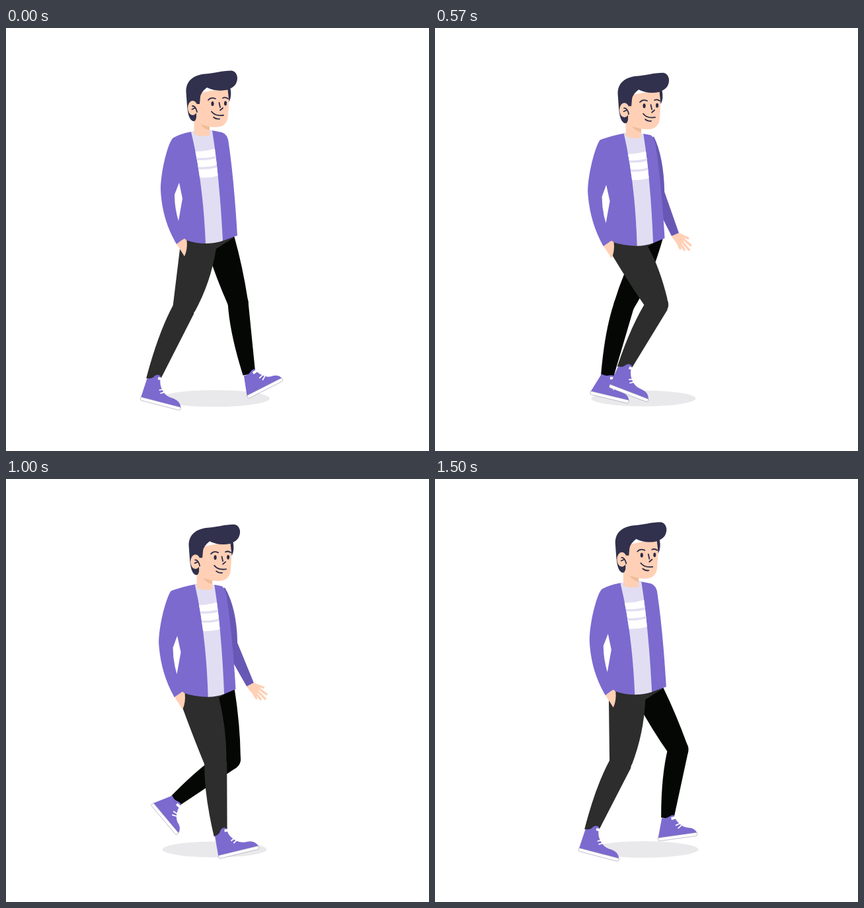
An HTML page that plays this animation: 640 px wide and 640 px high, repeating every 1570 ms.

```html
<!DOCTYPE html>
<html lang="en">
<head>
<meta charset="utf-8">
<title>Walk cycle</title>
<style>
html, body { margin: 0; width: 100%; height: 100%; overflow: hidden; background: #fff; }
svg { display: block; width: 100vw; height: 100vh; }
.skin { fill: #ffd0b5; }
.hair { fill: #31304d; }
.jacket { fill: #7c6acf; }
.near { fill: #2d2d2d; }
.far { fill: #040703; }
.ink { fill: none; stroke: #2b2a47; stroke-width: 1.8; stroke-linecap: round; stroke-linejoin: round; }
.sole { fill: #fff; stroke: #8d88a6; stroke-width: .5; }
.lace { fill: none; stroke: #fff; stroke-width: 1.8; }
.tab { fill: none; stroke: #fff; stroke-width: 4; }
</style>
</head>
<body>
<svg viewBox="0 0 640 640">
  <defs><clipPath id="clip"><path id="clipShirt"/></clipPath></defs>
  <ellipse id="shadow" cx="315.5" cy="560.5" fill="#e9e9eb"/>

  <g id="hand" class="skin">
    <path d="M-5 3L5-3Q12-1 15 5L10 15Q1 13-5 3Z"/>
    <path d="M6-1L20 3M10 3L25.500 13M9 7L24 20M7 10L17 21M4 10L10.500 20"
      fill="none" stroke="#ffd0b5" stroke-width="3.500" stroke-linecap="round"/>
  </g>
  <path id="arm" fill="#6858b5"/>

  <g class="far">
    <path id="farThigh"/><circle id="farKnee" r="15.500"/><path id="farShin"/>
  </g>
  <g id="farShoe">
    <path class="jacket" d="M0-4L10-34Q16-32 20-34Q26-37 29-35.500L30-31Q32-24 40-17Q44-14 50-13.500Q58-11 59.500-4Z"/>
    <path class="sole" d="M0-5H59.500V-2Q59.500 0 57 0H2Q0 0 0-2Z"/>
    <path class="tab" d="M24-31L31-32"/>
    <path class="lace" d="M29-20L36-22M32-15L38-19"/>
  </g>

  <g class="near">
    <path id="nearThigh"/><circle id="nearKnee" r="16.500"/><path id="nearShin"/>
  </g>
  <g id="nearShoe">
    <path class="jacket" d="M0-4L2-35Q9-35 12-41Q15-45 20-43.500Q23-41 22-37Q23-28 32-20Q38-15 48-15Q60-14 62.500-4Z"/>
    <path class="sole" d="M0-5H62.500V-2Q62.500 0 60 0H2Q0 0 0-2Z"/>
    <path class="tab" d="M18-39H23.500"/>
    <path class="lace" d="M24-22L31-25M27-17.500L34-22"/>
  </g>

  <path id="pocket" class="skin" d="M258 327L270 318L273.500 321Q275 335 270 345.500L264 336Z"/>
  <path id="jacket" class="jacket" fill-rule="evenodd"/>
  <path id="shirt" fill="#e1def3"/>
  <g clip-path="url(#clip)">
    <g id="stripes">
      <path fill="#fff" d="M280 187Q305 188 326 179V221Q312 228 288 226Z"/>
      <path fill="none" stroke="#e1def3" stroke-width="3.300" d="M284 198Q308 200 324 193M284 211.500Q310 214 326 206.500"/>
    </g>
  </g>

  <g id="head">
    <path class="skin" d="M284.500 130V160Q294 166 308 162.500V140Z"/>
    <path fill="#f0bd9b" d="M294 146L308 148.500V155Q300 153 294 146Z"/>
    <path class="skin" d="M284 100L336 90Q338 112 336 130C336 146 327 150 317 150C306 150 296 147 286 138Z"/>
    <path class="hair" d="M284 141C277 140 275 128 274 118L272.500 97C272 78 286 71 301 69.500C316 68.500 326 64.500 341 64.500C347 65 350 71 350 76C349.500 85 345 89 339.500 91.500Q342 103 337.500 112L335.500 93.500Q318 97 304 90Q295 97 294 104L293 115H288V135Q287 141 284 141Z"/>
    <ellipse class="skin" cx="282.500" cy="121" rx="7.500" ry="11"/>
    <path class="ink" d="M282 118Q287 118 289 127M281.500 123L286 121"/>
    <path class="ink" d="M306 109Q310 104 317 107M328 106Q332 104 336 107M322.500 113L324 120M324 124.500L328 121M311 126.500Q317 134 329 132M314 135Q318 138.500 323 137.500"/>
    <g fill="#2b2a47">
      <ellipse cx="312.500" cy="114.500" rx="2.100" ry="3.500"/>
      <ellipse cx="332" cy="114" rx="2" ry="3.400"/>
    </g>
  </g>
</svg>
<script>
const LOOP = 1570, FPS = 14, STEPS = 22, RAD = Math.PI / 180;
const $ = id => document.getElementById(id);
const set = (id, attrs) => { for (const a in attrs) $(id).setAttribute(a, attrs[a]); };

// Numbers written a>b run from a (torso at rest) to b (torso turned).
const JACKET = "M280>287 157>160Q260>266 161>164 252>249 167>170C244>242 177>180 234>231 218>220 234>230.5 245>248"
  + "Q236>233 290>293 258>254 327>331L270>267 318>322L273>270 321>325Q286>283 326>330 302>306.5 326>330.5"
  + "L328>331 322>326L350>347 314>319Q345>342 230>236 337>333 175>178Q336>331 161>166 327>326 158>163L312>316 155>161Z"
  + "M262>258.5 234>238L267>264 258>263L261>258 292>296Q255>252 272>276 255>252 252>256Z";
const SHIRT = "M280>287 157>160Q298>304 230>235 302>306.5 326>330.5Q316>320 326>330.5 328>330.5 322>326"
  + "Q323>327 225>230 312>316 155>161Z";
const mix = (path, k) => path.replace(/([\d.]+)>([\d.]+)/g, (_, a, b) => (+a + (b - a) * k).toFixed(2));

// Keys: step, knee x y, ankle x y, foot angle.
const LEGS = {
  near: {
    hip: [293, 335], knee: 17, ankle: 10, edge: [8, -14], heel: [11, -36],
    keys: [[0, 269, 425, 222.6, 531, 14.5], [3, 293, 429, 222, 513.7, 33], [6, 318, 427, 245.5, 504, 37],
      [10, 347, 411, 331.5, 521, 0], [12, 322, 427, 342, 533.5, -20.5], [16, 314, 429, 300.7, 537.6, -2.5],
      [21, 281, 430, 236.6, 531, 14.7]]
  },
  far: {
    hip: [322, 330], knee: 15.5, ankle: 9.5, edge: [5, -10], heel: [19, -35],
    keys: [[0, 351, 415, 367.5, 521, -27], [3, 333.5, 426, 318.8, 526.3, -15], [6, 304, 424, 283, 528, 0],
      [10, 277, 417, 240.8, 519, 27], [12, 312, 430, 237.4, 500, 37.6], [16, 357, 414, 278.4, 480, 53],
      [21, 368, 409, 352, 510.7, -8]]
  }
};
// Step, elbow x, wrist x y.
const ARM = [[0, 322, 310, 318], [3, 328, 328, 319], [6, 333, 351.5, 315], [10, 341, 373, 310],
  [12, 342, 375.5, 309.5], [16, 337, 359, 313], [21, 324, 314, 318]];
// Step, torso turn, head drop.
const BODY = [[0, 0, 0], [3, .3, 2.5], [6, .6, 3], [10, 1, 3.5], [12, 1, 4.2], [16, .6, 4], [21, .06, .8]];

const polar = (dx, dy) => [Math.atan2(dx, dy), Math.hypot(dx, dy)];
for (const leg of Object.values(LEGS)) {
  leg.keys = leg.keys.map(([i, kx, ky, ax, ay, foot]) =>
    [i, ...polar(kx - leg.hip[0], ky - leg.hip[1]), ...polar(ax - kx, ay - ky), foot]);
}

// Smooth periodic curve through the keys.
function sample(keys, step) {
  const n = keys.length;
  const time = j => keys[(j + n) % n][0] + STEPS * Math.floor(j / n);
  let j = n - 1;
  while (keys[j][0] > step) j--;
  const [ta, t0, t1, tb] = [-1, 0, 1, 2].map(d => time(j + d));
  const [pa, p0, p1, pb] = [-1, 0, 1, 2].map(d => keys[(j + d + n) % n]);
  const h = t1 - t0, u = (step - t0) / h, v = 1 - u;
  return p0.slice(1).map((_, c) => {
    c++;
    const m0 = (p1[c] - pa[c]) / (t1 - ta) * h, m1 = (pb[c] - p0[c]) / (tb - t0) * h;
    return p0[c] * (1 + 2 * u) * v * v + m0 * u * v * v + p1[c] * u * u * (3 - 2 * u) - m1 * u * u * v;
  });
}

const go = ([x, y], angle, len) => [x + Math.sin(angle) * len, y + Math.cos(angle) * len];
const side = ([x, y], angle, w) => [x + Math.cos(angle) * w, y - Math.sin(angle) * w];
const pt = p => p.map(v => v.toFixed(2)).join(" ");

function drawLeg(name, step, k) {
  const leg = LEGS[name];
  const [thigh, thighLen, shin, shinLen, foot] = sample(leg.keys, step);
  const knee = go(leg.hip, thigh, thighLen), ankle = go(knee, shin, shinLen);
  const back = side(knee, thigh, -leg.knee), front = side(knee, thigh, leg.knee);
  const backCtl = go(back, thigh + leg.edge[0] * RAD, -45);
  const frontCtl = go(front, thigh + leg.edge[1] * RAD, -50);
  const top = name === "near"
    ? `M263 335L268 316L345 317L${pt([318 + 5 * k, 334 - 4 * k])}`
    : "M304 335L310 312L345.5 316";
  const start = name === "near" ? "263 335" : "304 335";
  set(name + "Thigh", { d: `${top}Q${pt(frontCtl)} ${pt(front)}L${pt(back)}Q${pt(backCtl)} ${start}Z` });
  set(name + "Knee", { cx: knee[0], cy: knee[1] });

  const end = go(ankle, shin, 3);
  const calf = side(go(knee, shin, shinLen * .42), shin, -leg.knee - 4);
  set(name + "Shin", {
    d: `M${pt(side(knee, shin, -leg.knee))}Q${pt(calf)} ${pt(side(end, shin, -leg.ankle))}`
      + `L${pt(side(end, shin, leg.ankle))}L${pt(side(knee, shin, leg.knee))}Z`
  });
  set(name + "Shoe", {
    transform: `translate(${pt(ankle)}) rotate(${foot}) translate(${-leg.heel[0]} ${-leg.heel[1]})`
  });
}

function drawArm(step) {
  const [ex, wx, wy] = sample(ARM, step), ey = 252;
  const [angle] = polar(wx - ex, wy - ey), wrist = [wx, wy];
  set("arm", {
    d: `M318 180L331 164Q${pt([ex + 9, 195])} ${pt([ex + 10, ey - 4])}L${pt(side(wrist, angle, 6))}`
      + `L${pt(side(wrist, angle, -6))}L${pt([ex - 9, ey + 4])}Z`
  });
  set("hand", { transform: `translate(${pt(wrist)}) rotate(${(29 - angle / RAD) * 1.5})` });
}

function draw(step) {
  const [k, drop] = sample(BODY, step);
  const pulse = Math.cos(4 * Math.PI * step / STEPS);
  set("shadow", { rx: 79.5 + 4 * pulse, ry: 12 + .6 * pulse });
  drawArm(step);
  drawLeg("far", step, k);
  drawLeg("near", step, k);
  const shirt = mix(SHIRT, k);
  set("jacket", { d: mix(JACKET, k) });
  set("shirt", { d: shirt });
  set("clipShirt", { d: shirt });
  set("stripes", { transform: `translate(${5 * k} ${4.5 * k})` });
  set("pocket", { transform: `translate(${-3.5 * k} ${4 * k})` });
  set("head", { transform: `translate(${5 * k} ${drop})` });
}

function tick() {
  const t = performance.now() % LOOP;
  draw(Math.min(STEPS - 1, Math.floor((t + 4.5) * FPS / 1000)));
  requestAnimationFrame(tick);
}
tick();
</script>
</body>
</html>
```
